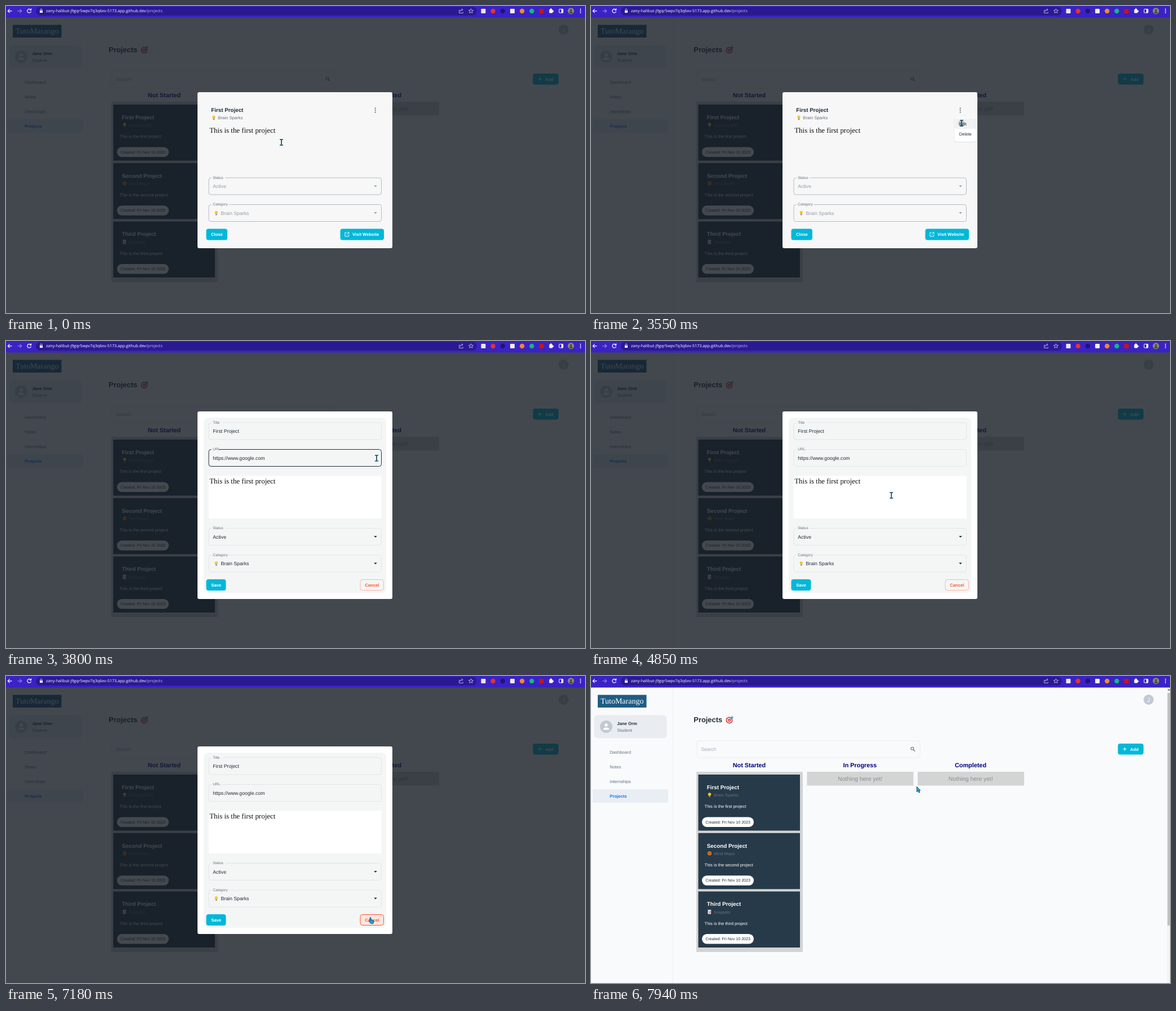
An HTML page for the animation above (8 s loop, 1028 by 545 pixels).

```html
<!DOCTYPE html>
<html lang="en">
<head>
<meta charset="utf-8">
<title>Projects</title>
<style>
  html, body { margin: 0; width: 100%; height: 100%; overflow: hidden; background: #f9fafb; }
  svg { display: block; width: 1028px; height: 545px; }
  text { font-family: "Liberation Sans", Arial, sans-serif; text-rendering: geometricPrecision; white-space: pre; }
  .b { font-weight: 700; }
  .serif { font-family: "Liberation Serif", "Times New Roman", serif; }
  .ui { font-family: "Open Sans", sans-serif; }
  .mid { text-anchor: middle; }
</style>
</head>
<body>
<svg id="stage" viewBox="0 0 1028 545"></svg>
<script>
const DARK = '#212b36', GREY = '#637381', CYAN = '#00b8d9', RED = '#ff5630';

const rect = (x, y, w, h, fill, r = 0, more = '') =>
  `<rect x="${x}" y="${y}" width="${w}" height="${h}" rx="${r}" fill="${fill}" ${more}/>`;
const circle = (x, y, r, fill, more = '') => `<circle cx="${x}" cy="${y}" r="${r}" fill="${fill}" ${more}/>`;
const line = (d, color, width = 1, fill = 'none') =>
  `<path d="${d}" stroke="${color}" stroke-width="${width}" fill="${fill}" stroke-linejoin="round"/>`;
const text = (x, y, size, fill, str, cls = '') =>
  `<text x="${x}" y="${y}" font-size="${size}" fill="${fill}" class="${cls}">${str}</text>`;
const group = (id, body) => `<g id="${id}">${body}</g>`;
const at = (x, y, body) => `<g transform="translate(${x} ${y})">${body}</g>`;

// Small pictograms centred on 0,0
const bulb = circle(0, -1, 2.7, '#fcc52d') + rect(-1.3, 1.3, 2.6, 2.7, '#8b9299', .7);
const pretzel = circle(0, 0, 3.6, '#d9822b') + circle(-1.3, -.5, 1, '#7b3f10') +
  circle(1.3, -.5, 1, '#7b3f10') + circle(0, 1.9, .8, '#7b3f10');
const memo = rect(-3, -3.5, 5.6, 7.4, '#e8e8ee', .5) +
  line('M-2 -1.5h3.5M-2 .2h3', '#8b95a5', .6) + line('M-.5 2.5L3 -1', '#d9534f', 1.3);
const target = circle(0, .5, 6, '#dd3a3a') + circle(0, .5, 4.3, '#fff') + circle(0, .5, 2.8, '#dd3a3a') +
  circle(0, .5, 1.2, '#fff') + line('M0 .5L4.6 -4.2', '#3b88c3', 1.2) + line('M3.4 -3l.3 -2.4 2 -1.2 0 2 1.6 .3 -1.6 1.5z', '#3b88c3', .6, '#55acee');
const magnifier = circle(-.8, -.8, 2.5, 'none', `stroke="${GREY}" stroke-width="1.1"`) + line('M1.1 1.1L4 4', GREY, 1.3);
const caret = (x, y, fill) => `<path d="M${x - 2.8} ${y - 1.4}h5.6l-2.8 2.9z" fill="${fill}"/>`;
const dots = (x, y, step, fill) => [-1, 0, 1].map(i => circle(x, y + i * step, 1, fill)).join('');

function browserBar() {
  const white = '#fff', extensions = ['#e9eaee', '#e5322d', '#1c1480', '#f4f1ee', '#f08a24', '#15b87f', '#c01818'];
  return rect(0, 0, 1028, 20.5, '#3a22c4') + rect(53, 1.5, 783, 15.5, '#2a1a91', 7.7) +
    line('M10.5 8.8H3.5M6.6 5.4L3.2 8.8l3.4 3.4', white, 1.2) +
    line('M20.5 8.8h7M24.4 5.4l3.4 3.4 -3.4 3.4', '#8f83e0', 1.2) +
    line('M44 6.6A3.4 3.4 0 1 0 44.6 9.6M44.6 4.6v2.7h-2.7', white, 1.2) +
    rect(60, 8, 5, 4, white, .6) + line('M61 8V6.6a1.5 1.5 0 0 1 3 0V8', white, .8) +
    text(71, 11.4, 7.2, white, 'zany-halibut-j9gqr5wpv7q3q6xv-5173.app.github.dev<tspan fill="#c3bbee">/projects</tspan>', 'ui') +
    line('M806.5 7.5h-1.8v5h6.6v-2M806.5 10q.4 -3.6 4 -3.6M809 4.5l2.2 1.9 -2.2 1.9', '#d5d0f4', .8) +
    line('M825.5 4.8l1.2 2.7 2.9 .2 -2.3 1.9 .8 2.8 -2.6 -1.6 -2.6 1.6 .8 -2.8 -2.3 -1.9 2.9 -.2z', '#d5d0f4', .8) +
    extensions.map((c, i) => i % 3 ? circle(847.5 + i * 17.2, 9, 4.2, c) : rect(843.5 + i * 17.2, 5, 8, 8, c, 1)).join('') +
    rect(964.5, 6, 6, 6.5, white, .8) + circle(967.5, 5.6, 1.4, white) + circle(971, 9.3, 1.4, white) +
    rect(982, 5.5, 7, 6.6, 'none', .8, 'stroke="#fff"') + rect(986, 5.5, 3, 6.6, white) +
    circle(1003, 8.8, 5.6, '#8c8f6a') + circle(1003, 7.4, 1.9, '#4a4c3c') + rect(1000, 9.6, 6, 3.6, '#4a4c3c', 1.8) +
    dots(1020, 8.8, 3, white);
}

function card(y, name, icon, category, ordinal) {
  return rect(190.5, y, 180.5, 99.5, '#263a49') +
    text(205.8, y + 25.7, 9.8, '#fff', name, 'b') + at(210.5, y + 36, icon) +
    text(218, y + 39, 7.6, '#637381', category) +
    text(201.5, y + 59.2, 7.6, '#fff', `This is the ${ordinal} project`) +
    rect(197, y + 75.5, 92, 17.5, '#fff', 8.7) + text(203.3, y + 86.6, 7.1, DARK, 'Created: Fri Nov 10 2023');
}

function page() {
  const nav = ['Dashboard', 'Notes', 'Internships'].map((s, i) => text(33.3, 137.8 + i * 26, 7.7, GREY, s)).join('');
  const columns = ['Not Started', 'In Progress', 'Completed'].map((s, i) => {
    const x = 187 + i * 196.5;
    return text(x + 94, 162.3, 10.85, '#00007f', s, 'b mid') + rect(x, 170, 189, i ? 24.5 : 320, '#d3d4d4') +
      (i ? text(x + 94.3, 185.6, 10.4, '#8a8d90', 'Nothing here yet!', 'mid') : '');
  }).join('');
  return rect(0, 20, 1028, 525, '#f9fafb') +
    line('M145.5 20.5V545', '#edeff1') +
    rect(12, 33.5, 86.5, 22.5, '#1f5c85') + text(55.2, 49, 14, '#fff', 'TutoMarango', 'serif mid') +
    rect(5.5, 69.5, 129, 41, '#e9ecf1', 6) + circle(27, 90, 11, '#c1cad3') +
    circle(27, 87, 2.7, '#fff') + line('M21.6 95.6q0 -4 5.4 -4t5.4 4z', 'none', 0, '#fff') +
    text(46.3, 86.8, 7.7, DARK, 'Jane Orm', 'b') + text(46.3, 98.5, 7.7, GREY, 'Student') +
    nav + rect(3, 201, 134, 24, '#e9edf4', 3) + text(33.3, 215.8, 7.7, '#1976e8', 'Projects', 'b') +
    circle(990, 42, 9, '#c1cad3') + text(990, 45.8, 10, '#fff', 'J', 'mid') +
    text(182.3, 82.3, 12.9, DARK, 'Projects', 'b') + at(245.5, 78, target) +
    rect(188, 115, 396, 30, 'none', 4, 'stroke="#e9ecef"') + text(195.2, 133, 8.6, '#a0abb6', 'Search') +
    at(571.3, 129.6, magnifier) +
    rect(935.5, 120, 45.5, 19.5, CYAN, 4) + line('M944.3 129.8h6.6M947.6 126.5v6.6', '#fff', 1) +
    text(957.2, 132.6, 7.7, '#fff', 'Add', 'b') + columns +
    card(175, 'First Project', bulb, 'Brain Sparks', 'first') +
    card(278.8, 'Second Project', pretzel, 'Mind Maze', 'second') +
    card(382.5, 'Third Project', memo, 'Snippets', 'third');
}

const scrollbar = rect(1023, 20.5, 5, 524.5, '#f3f3f4') + rect(1023.5, 30, 4.5, 413, '#bfc0c1') + caret(1026, 25, '#777');

function field(id, y, label, value, { border, ink, back, icon, select }) {
  return rect(360, y, 306.5, 30, 'none', 4, `id="${id}" stroke="${border}"`) +
    rect(364.5, y - 1, label.length * 3.4 + 4, 2, back) + text(367.2, y + 1.6, 6.55, GREY, label) +
    (icon ? at(373.3, y + 15, icon) : '') + text(icon ? 381.4 : 367.2, y + 18.2, 8.75, ink, value) +
    (select ? caret(656, y + 15, ink) : '');
}

const button = (x, y, w, label, tx) => rect(x, y, w, 20, CYAN, 4) + text(tx, y + 12.9, 7.65, '#fff', label, 'b');
const firstLine = y => text(361.2, y, 12.95, '#111', 'This is the first project', 'serif');

function viewDialog() {
  const look = { border: '#b4bcc5', ink: '#919eab', back: '#f7f7f7', select: true };
  return rect(340, 153, 346, 277, '#f7f7f7', 3) +
    text(364.2, 187.7, 9.8, DARK, 'First Project', 'b') + at(369, 198.3, bulb) +
    text(376.3, 200.9, 7.7, GREY, 'Brain Sparks') + dots(655.6, 185, 3.4, '#46525e') + firstLine(225) +
    field('viewStatus', 305, 'Status', 'Active', look) +
    field('viewCategory', 352.5, 'Category', 'Brain Sparks', { ...look, icon: bulb }) +
    button(355.5, 395.5, 37.5, 'Close', 364) + button(593.5, 395.5, 77.5, 'Visit Website', 615) +
    line('M605 402.3h-3.2v6.7h6.8v-3.2M606 401.8h3v3M609 401.8l-4.4 4.4', '#fff', .9);
}

const menu = rect(644.5, 199, 40, 43, '#919eab', 4, 'opacity=".25"') + rect(645, 198, 39, 43, '#fff', 4) +
  rect(645, 199.5, 39, 18.5, '#f1f2f3', 0, 'id="menuHover"') + circle(657.5, 208.5, 6, '#c9ced4', 'id="ripple"') +
  text(653.8, 211.7, 7.6, DARK, 'Edit') + text(653.8, 230.3, 7.6, DARK, 'Delete');

function editDialog() {
  const look = { border: '#e1e5e8', ink: DARK, back: '#f4f6f6' };
  return rect(340, 125, 346, 333, '#fff', 3) + rect(351, 136, 324, 311, '#f4f6f6', 8) +
    field('title', 145, 'Title', 'First Project', look) +
    field('url', 192.5, 'URL', 'https://www.google.com', look) +
    rect(360, 239.5, 306.5, 75.5, '#fff') + firstLine(252.7) +
    field('status', 332.5, 'Status', 'Active', { ...look, select: true }) +
    field('category', 380, 'Category', 'Brain Sparks', { ...look, select: true, icon: bulb }) +
    button(355.5, 423, 35, 'Save', 364.2) +
    rect(629, 423.5, 41.5, 19, 'none', 4, 'id="cancel"') + text(637.3, 435.9, 7.65, RED, 'Cancel', 'b');
}

const cursors = {
  beam: line('M-3 -5h6M0 -5v10M-3 5h6', '#0d4a63', 1.7),
  arrow: line('M.5 .5v9l2 -1.8 1.6 3.4 1.7 -.8 -1.6 -3.2h2.7z', '#123a4e', .9, '#12b5ea'),
  hand: line('M-.9 1.2Q0 -.4 .9 1.2V5l4 .9q1.3 .4 1 2L5 11.3H.6L-2.6 7.4q.2 -1.4 1.7 -.4z', '#0e3b50', .9, '#12a9dc')
};

document.getElementById('stage').innerHTML =
  group('page', page()) + group('scrollbar', scrollbar) +
  rect(0, 20, 1028, 525, '#161c24', 0, 'id="dim" fill-opacity=".8"') +
  group('view', viewDialog()) + group('menu', menu) + group('edit', editDialog()) + browserBar() +
  group('cursor', Object.entries(cursors).map(([id, body]) => group(id, body)).join(''));

const el = id => document.getElementById(id);
const show = (id, on) => el(id).setAttribute('opacity', +on);

// Pointer path: tick, x, y and, where it changes, the pointer shape
const path = [
  [0, 489, 242, 'beam'], [1, 489, 242], [2, 481, 249], [3, 464, 264, 'arrow'], [4, 452, 286], [6, 439, 314],
  [8, 439, 314], [9, 450, 352], [10, 500, 367], [11, 628, 369], [12, 637, 330], [13, 646, 256], [14, 672, 208],
  [15, 670, 206], [16, 665, 201], [17, 660, 189, 'hand'], [18, 657, 187], [19, 660, 196, 'arrow'], [21, 669, 231],
  [23, 645, 210], [24, 648, 208], [26, 655, 209], [27, 658, 208, 'beam'], [32, 658, 208], [33, 600, 232, 'arrow'],
  [34, 534, 261, 'beam'], [36, 534, 274], [39, 533, 274], [41, 531, 272], [42, 531, 272], [43, 530, 288, 'arrow'],
  [45, 542, 367], [46, 575, 386, 'hand'], [47, 608, 401], [48, 611, 411, 'arrow'], [49, 590, 415], [51, 452, 426],
  [52, 445, 427], [54, 630, 426], [55, 641, 427, 'hand'], [56, 647, 428], [58, 647, 428], [59, 638, 395, 'arrow'],
  [62, 578, 196]
];

function pointer(tick) {
  let i = path.findIndex(p => p[0] > tick) - 1;
  if (i < 0) i = path.length - 1;
  const a = path[i], b = path[i + 1] || a, f = (tick - a[0]) / (b[0] - a[0] || 1);
  const shape = path.slice(0, i + 1).reverse().find(p => p[3])[3];
  return { x: a[1] + (b[1] - a[1]) * f, y: a[2] + (b[2] - a[2]) * f, shape };
}

function draw() {
  const t = performance.now() % 8000;
  const tick = Math.floor((t + 40) / 128);   // the screen refreshes in coarse steps
  const within = (from, to) => tick >= from && tick < to;
  const open = Math.max(0, Math.min(1, (60 - tick) / 3));

  show('dim', open);
  show('scrollbar', open === 0);
  show('view', tick < 29);
  show('menu', within(19, 29));
  show('menuHover', tick >= 24);
  show('ripple', within(28, 29));
  show('edit', tick < 29 ? 0 : open);
  el('url').setAttribute('stroke', within(29, 33) ? DARK : '#e1e5e8');
  el('category').setAttribute('stroke', within(46, 48) ? DARK : '#e1e5e8');
  el('cancel').setAttribute('fill', tick >= 55 ? '#fde6e1' : 'none');
  el('cancel').setAttribute('stroke', tick >= 55 ? RED : '#ffb3a3');

  const p = pointer(tick);
  el('cursor').setAttribute('transform', `translate(${p.x} ${p.y})`);
  for (const id in cursors) show(id, id === p.shape);
  requestAnimationFrame(draw);
}
draw();
</script>
</body>
</html>
```
